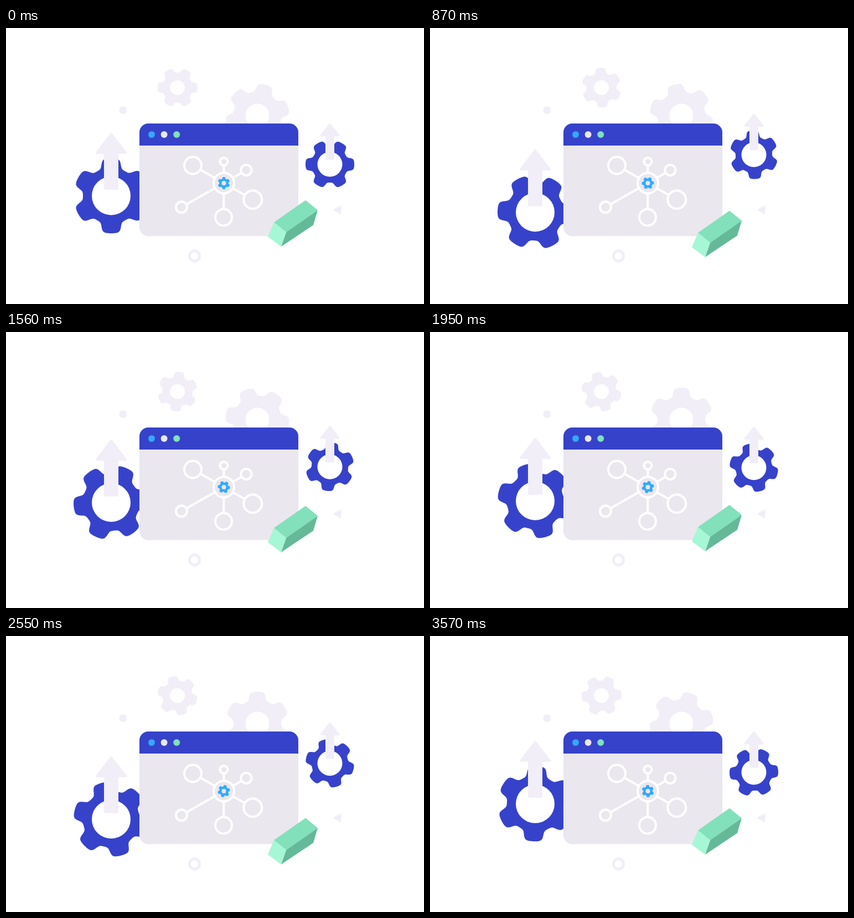
Write an HTML page with a canvas that moves like this. It is 755 px wide and 500 px high and loops after 3600 ms.

```html
<!DOCTYPE html>
<html lang="en">
<head>
<meta charset="utf-8">
<title>Gears</title>
<style>
  html, body { margin: 0; overflow: hidden; background: #fff; }
  canvas { display: block; }
</style>
</head>
<body>
<canvas id="stage" width="755" height="500"></canvas>
<script>
const ctx = document.getElementById('stage').getContext('2d');
const LOOP = 3600, TAU = Math.PI * 2;
const BLUE = '#3742cb', PALE = '#f1eef8', PANEL = '#eae7ee', SKY = '#33a9ff', MINT = '#82e0bb';

function circle(x, y, r, fill, stroke, width) {
  ctx.beginPath();
  ctx.arc(x, y, r, 0, TAU);
  if (fill) { ctx.fillStyle = fill; ctx.fill(); }
  if (stroke) { ctx.strokeStyle = stroke; ctx.lineWidth = width; ctx.stroke(); }
}

function polygon(points, color, round = 0) {
  ctx.beginPath();
  points.forEach(([x, y]) => ctx.lineTo(x, y));
  ctx.closePath();
  ctx.fillStyle = color;
  ctx.fill();
  if (round) {
    ctx.strokeStyle = color;
    ctx.lineWidth = round;
    ctx.lineJoin = 'round';
    ctx.stroke();
  }
}

// Six soft teeth; at angle 0 one tooth points right.
function gear(x, y, radius, hole, angle, color) {
  ctx.beginPath();
  for (let i = 0; i < 180; i++) {
    const a = i / 180 * TAU;
    const r = radius * (0.873 + 0.128 * Math.tanh(2.4 * (Math.cos(6 * a) + 0.22)));
    ctx.lineTo(x + r * Math.cos(a + angle), y + r * Math.sin(a + angle));
  }
  ctx.closePath();
  ctx.moveTo(x + hole, y);
  ctx.arc(x, y, hole, 0, TAU);
  ctx.fillStyle = color;
  ctx.fill('evenodd');
}

function arrow(x, tip, halfHead, headHeight, halfShaft, length) {
  polygon([[x, tip + 2.5], [x + halfHead - 3, tip + headHeight - 2], [x - halfHead + 3, tip + headHeight - 2]], PALE, 4);
  ctx.beginPath();
  ctx.roundRect(x - halfShaft, tip + headHeight - 4, halfShaft * 2, length - headHeight + 4, [0, 0, 2, 2]);
  ctx.fill();
}

function panel(y, h, radii, color) {
  ctx.beginPath();
  ctx.roundRect(241, y, 287, h, radii);
  ctx.fillStyle = color;
  ctx.fill();
}

function network(spin) {
  const x = 393.5, y = 281;
  const nodes = [[337.5, 249, 15.5], [393.5, 242, 7], [434, 257.5, 9.5],
                 [445.7, 311, 16.5], [393, 343, 15], [317, 324.5, 10]];
  ctx.strokeStyle = '#fff';
  ctx.lineWidth = 4;
  for (const [nx, ny] of nodes) {
    ctx.beginPath();
    ctx.moveTo(x, y);
    ctx.lineTo(nx, ny);
    ctx.stroke();
  }
  for (const [nx, ny, r] of nodes) circle(nx, ny, r, PANEL, '#fff', 4);
  circle(x, y, 18.5, PANEL, '#fff', 4);
  gear(x, y, 11, 4, spin + Math.PI / 2, SKY);
}

function block(dy) {
  ctx.save();
  ctx.translate(0, dy);
  polygon([[484, 352], [541, 312], [563, 330], [506, 370]], MINT);
  polygon([[506, 370], [563, 330], [555, 357], [497, 396]], '#64b999');
  polygon([[484, 352], [506, 370], [497, 396], [473, 378]], '#a6f7d5');
  ctx.restore();
}

function draw(now) {
  const t = now % LOOP / LOOP;
  const spin = t * TAU;
  const bob = (1 - Math.cos(2 * spin)) / 2;
  ctx.clearRect(0, 0, 755, 500);

  circle(211.3, 148.8, 7, PALE);
  circle(340.5, 413, 9.3, null, PALE, 5);
  polygon([[593, 329], [605, 323.5], [603.5, 336]], PALE, 3);

  gear(309.7, 108, 36, 13.3, spin, PALE);
  gear(454, 158.5, 57.5, 21.5, -spin - TAU * 75 / 360, PALE);

  gear(190, 304 + 30 * bob, 68, 35, -spin + Math.PI / 2, BLUE);
  arrow(190, 189.5 + 30 * bob, 29, 38.5, 13, 103.5);

  gear(585, 247 - 17.5 * bob, 44, 22.5, spin, BLUE);
  arrow(585, 172.5 - 17.5 * bob, 18.5, 24, 8, 66.5);

  panel(173, 204, 16, PANEL);
  panel(173, 40, [16, 16, 0, 0], BLUE);
  [SKY, PANEL, MINT].forEach((color, i) => circle(263 + i * 22.6, 193, 6, color));
  network(spin);
  block(19 * bob);
}

function tick() {
  draw(performance.now());
  requestAnimationFrame(tick);
}
tick();
</script>
</body>
</html>
```
